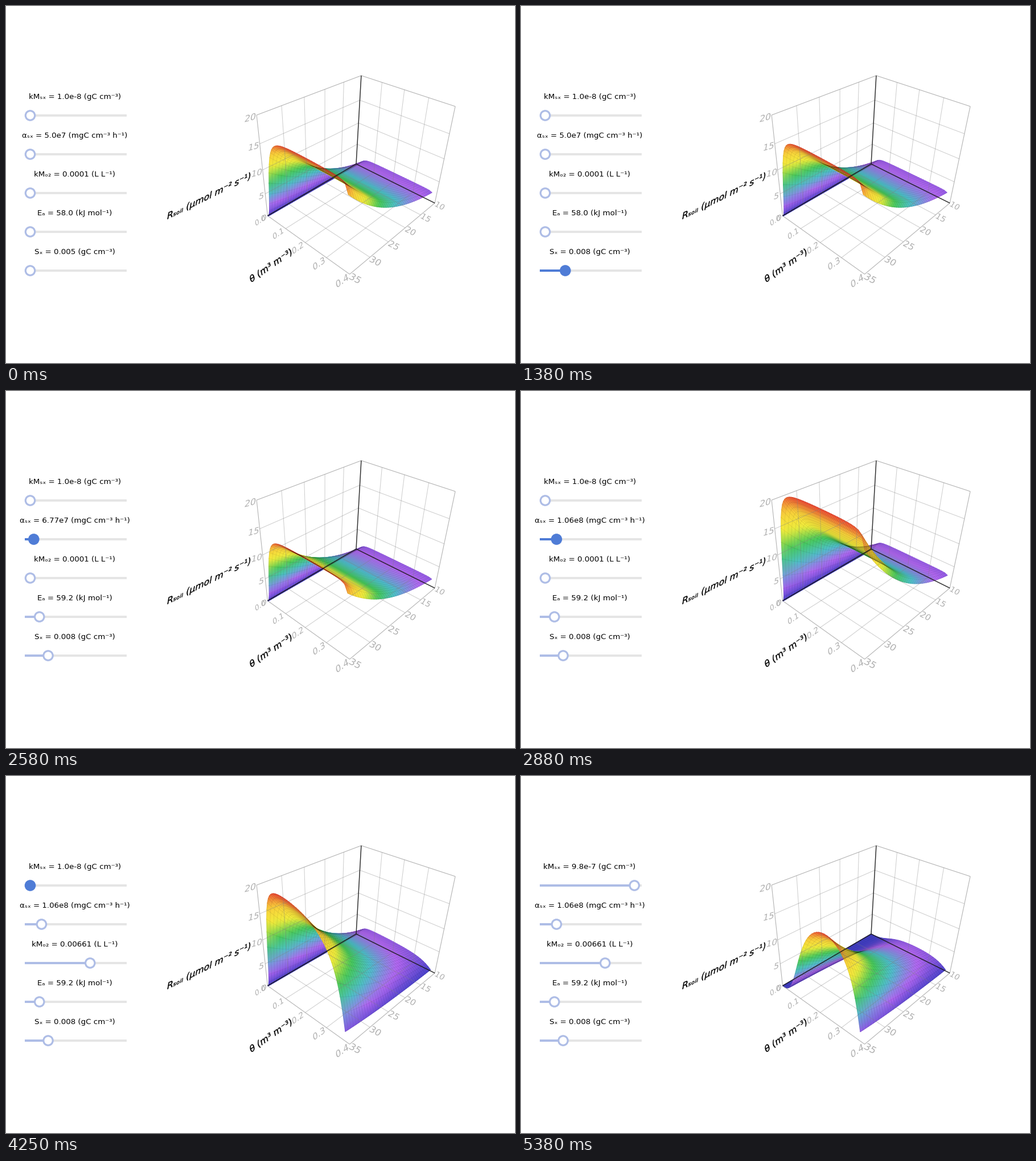
These frames come from a looping animation (894x626 px, 8330 ms). A matplotlib script:

```python
import matplotlib.pyplot as plt
import numpy as np
from matplotlib.animation import FuncAnimation
from matplotlib.collections import LineCollection, QuadMesh
from matplotlib.colors import LinearSegmentedColormap
from matplotlib.patches import Circle, PathPatch
from matplotlib.textpath import TextPath
from matplotlib.transforms import Affine2D

W, H, DPI = 894, 626, 64
FRAMES, STEP = 238, 35
PT = 72 / DPI  # points per pixel

plt.rcParams["font.family"] = "DejaVu Sans"
fig = plt.figure(figsize=(W / DPI, H / DPI), dpi=DPI, facecolor="white")
ax = fig.add_axes([0, 0, 1, 1])
ax.set_xlim(0, W)
ax.set_ylim(H, 0)
ax.axis("off")

# ---------- three-point perspective ----------
# Unit box: u = moisture, v = temperature, w = flux; the back corner is the origin.
# Each column is a vanishing point times the foreshortening along that axis.
CAM = np.column_stack([
    -0.1287 * np.array([-320, -187, 1]),
    -0.1750 * np.array([1348, -151, 1]),
    -0.1355 * np.array([558, 1266, 1]),
    np.array([615, 277, 1]),
])


def project(u, v, w):
    u, v, w = np.broadcast_arrays(u, v, w)
    x, y, d = np.tensordot(CAM, np.stack([u, v, w, np.ones(u.shape)]), 1)
    return np.stack([x / d, y / d], -1)


# ---------- soil respiration model ----------
# Moisture samples crowd towards zero, where the flux rises steeply.
theta = 0.38 * np.linspace(0, 1, 46)[:, None] ** 1.5
temp = np.linspace(10, 35, 40)[None, :]
POROSITY = 1 - 1.5396 / 2.52
OXYGEN = 1.67 * 0.209 * (POROSITY - theta) ** (4 / 3)
TO_FLUX = 1e4 * 10 / 1000 / 12 * 1e6 / 3600


def flux(km_sx, alpha, km_o2, ea, sx):
    vmax = alpha * np.exp(-ea / (8.314472e-3 * (273.15 + temp)))
    substrate = sx * 2.4e-2 * 3.17 * theta ** 3
    return (vmax * substrate / (km_sx + substrate)
            * OXYGEN / (km_o2 + OXYGEN) * TO_FLUX)


CMAP = LinearSegmentedColormap.from_list("flux", [
    "#4340c8", "#b468f2", "#4fc0cc", "#46c95a", "#f2ee3c", "#f8cf3a", "#ec4a34"])

wires = LineCollection([], colors=[(0, 0, 0, 0.11)], linewidths=0.6 * PT, zorder=3)
ax.add_collection(wires)
surface = []


def draw_surface(r):
    # Rows run from the back corner to the viewer, so no depth sort is needed.
    pts = project(theta / 0.4, (temp - 10) / 25, r / 20)
    while surface:
        surface.pop().remove()
    mesh = QuadMesh(pts, shading="gouraud", cmap=CMAP, zorder=2)
    mesh.set_array(r)
    mesh.set_clim(0, r.max())
    surface.append(ax.add_collection(mesh, autolim=False))
    wires.set_segments(list(pts) + list(pts.swapaxes(0, 1)))


# ---------- box, grid and axis lines ----------
def add_lines(pairs, color, width, z):
    segs = [project(*np.transpose(np.array(pair, float))) for pair in pairs]
    ax.add_collection(LineCollection(segs, colors=[color], linewidths=width * PT,
                                     zorder=z))


grid = []
for k in (0.25, 0.5, 0.75):
    grid += [((k, 0, 0), (k, 1, 0)), ((k, 0, 0), (k, 0, 1)),
             ((0, 0, k), (1, 0, k)), ((0, 0, k), (0, 1, k))]
for k in (0.2, 0.4, 0.6, 0.8):
    grid += [((0, k, 0), (1, k, 0)), ((0, k, 0), (0, k, 1))]
# Each outer edge is a unit step along one axis from the end of another.
units = np.eye(3)
edges = [(units[i], units[i] + units[j]) for i in range(3) for j in range(3)
         if i != j]
axes3 = [(0 * e, e) for e in units]
add_lines(grid, (0.5, 0.5, 0.5, 0.4), 1.0, 4)
add_lines(edges, (0.5, 0.5, 0.5, 0.6), 1.1, 4)
add_lines(axes3, (0.1, 0.1, 0.1, 0.9), 1.5, 5)


# ---------- slanted labels ----------
def slanted(text, center, base, up, size, color="#b0b0b0", weight=0.0):
    path = TextPath((0, 0), text, size=1, prop={"family": "DejaVu Sans"})
    box = path.get_extents()
    place = Affine2D().translate(-(box.x0 + box.x1) / 2, -(box.y0 + box.y1) / 2)
    place += Affine2D.from_values(*base, *up, 0, 0).scale(size).translate(*center)
    ax.add_patch(PathPatch(place.transform_path(path), facecolor=color,
                           edgecolor=color, linewidth=weight * PT, zorder=6))


for k in np.linspace(0, 1, 5):
    text = f"{20 * k:.0f}"
    slanted(text, project(0, 1.02 + 0.0135 * len(text), k),
            (0.96, -0.26), (0.17, -0.98), 15 + 1.3 * k)
    slanted(f"{0.4 * k:.1f}", project(k, 1.07, 0),
            (0.82, -0.58), (-0.2, -0.92), 13.5 + 3.5 * k)
for k in np.linspace(0, 1, 6):
    slanted(f"{10 + 25 * k:.0f}", project(1.058, k, 0),
            (0.88, 0.47), (0.53, -0.82), 13.8 + 3 * k)
slanted("Rₛₒᵢₗ (μmol m⁻² s⁻¹)", (356.5, 334), (0.9, -0.44), (0.17, -0.96), 17.4,
        "black", 0.35)
slanted("θ (m³ m⁻³)", (465, 455.5), (0.82, -0.57), (-0.23, -0.9), 16.9,
        "black", 0.35)


# ---------- sliders ----------
def sci(v, digits):
    m, e = f"{v:.{digits}e}".split("e")
    return f"{float(m)}e{int(e)}"


X0, X1, LEFT, RIGHT = 42.5, 202.5, 33, 212
IDLE, HELD, TRACK = "#aebde6", "#4f7cd6", "#e5e5e5"


class Slider:
    def __init__(self, row, lo, hi, label, held, *path):
        self.y = 192 + 68 * row
        self.lo, self.hi, self.label, self.held = lo, hi, label, held
        self.times, self.xs = zip(*path)
        style = dict(linewidth=4 * PT, solid_capstyle="butt")
        ax.plot([LEFT, RIGHT], [self.y] * 2, color=TRACK, zorder=7, **style)
        self.bar, = ax.plot([LEFT, X0], [self.y] * 2, zorder=8, **style)
        self.knob = ax.add_patch(Circle((X0, self.y), 8.2, linewidth=3.2 * PT, zorder=9))
        self.text = ax.text(120.5, self.y - 29, "", ha="center", va="baseline",
                            fontsize=13.4 * PT, color="black")

    def update(self, t):
        x = np.interp(t, self.times, self.xs)
        value = self.lo + (x - X0) / (X1 - X0) * (self.hi - self.lo)
        down = self.held[0] <= t < self.held[1]
        color = HELD if down else IDLE
        self.bar.set_xdata([LEFT, x])
        self.bar.set_color(color)
        self.bar.set_visible(x > X0 + 0.2)
        self.knob.center = (x, self.y)
        self.knob.set_edgecolor(color)
        self.knob.set_facecolor(HELD if down else "white")
        self.text.set_text(self.label(value))
        return value


# Each drag: row, value range, label, time held, then (time, x) key points.
sliders = [
    Slider(0, 1e-8, 1e-6, lambda v: f"kMₛₓ = {sci(v, 1)} (gC cm⁻³)",
           (4200, 5250), (4290, X0), (5220, 199.2)),
    Slider(1, 5e7, 5e8, lambda v: f"αₛₓ = {sci(v, 2)} (mgC cm⁻³ h⁻¹)",
           (2380, 3060), (2440, X0), (2860, 62.4)),
    Slider(2, 1e-4, 1e-2, lambda v: f"kMₒ₂ = {f'{v:.5f}'.rstrip('0')} (L L⁻¹)",
           (3130, 4140), (3130, X0), (3580, 43), (3620, 49.1), (4090, 147.7)),
    Slider(3, 58, 70, lambda v: f"Eₐ = {v:.1f} (kJ mol⁻¹)",
           (1600, 2250), (1640, X0), (2100, 58.7)),
    Slider(4, 0.005, 0.02, lambda v: f"Sₓ = {v:.3f} (gC cm⁻³)",
           (40, 1520), (40, X0), (540, 44.5), (1150, 86), (1490, 74)),
]


def update(i):
    t = (i + 0.5) * STEP
    draw_surface(flux(*(s.update(t) for s in sliders)))
    return []


anim = FuncAnimation(fig, update, frames=FRAMES, interval=STEP, repeat=True,
                     repeat_delay=0, init_func=lambda: update(0), blit=False)
plt.show()
```
